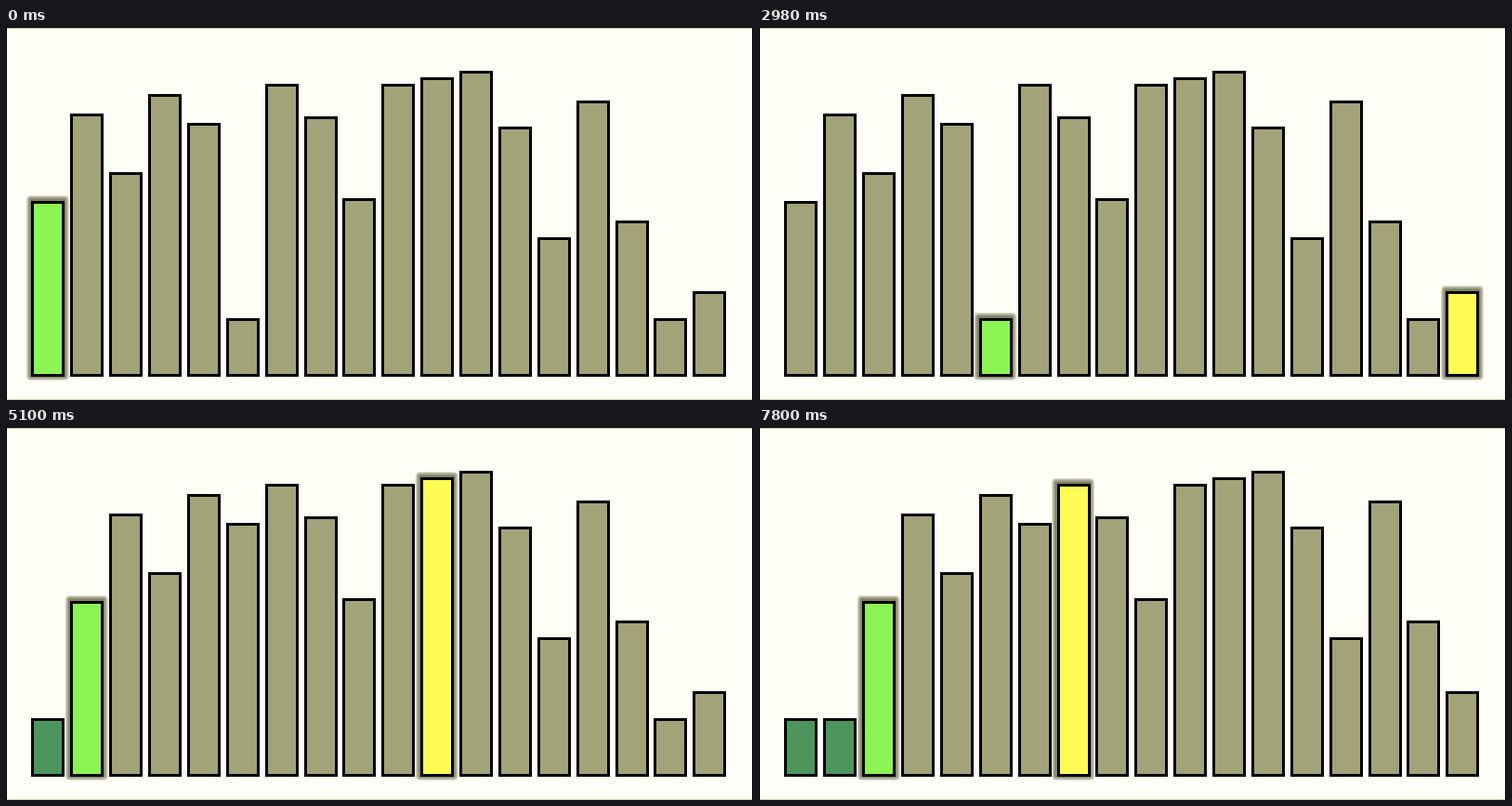
A matplotlib script for the animation above (8 s loop, 804 by 400 pixels).

```python
import matplotlib.pyplot as plt
from matplotlib.animation import FuncAnimation
from matplotlib.patches import FancyBboxPatch, Rectangle

W, H, DPI = 804, 400, 64
INTERVAL, LOOP = 20, 8000
TICK = 141.7                                   # one step of the sort, in ms
HOLDS = {3, 8, 14, 18, 22, 25, 32, 37, 41, 46, 49}   # ticks without a new step
LEFT, PITCH, BAR_W, FLOOR = 28.4, 41.88, 33, 372.5
TOPS = [186, 92, 155, 71, 102, 312, 60, 95, 183,
        60, 53, 46, 106, 225, 78, 207, 312, 283]
IDLE, LOWEST, CHECKED, SORTED = "#a3a37a", "#8cf454", "#fffb55", "#4c965d"
GLOW_SIZES = range(5, 0, -1)


def px(n):
    return n * 72 / DPI


def selection_sort(tops):
    """Yield (tops, sorted count, lowest index, checked index)."""
    tops = list(tops)
    for start in range(len(tops)):
        low = start
        yield list(tops), start, low, None
        for i in range(start + 1, len(tops)):
            yield list(tops), start, low, i
            if tops[i] > tops[low]:
                low = i
        yield list(tops), start, low, None
        tops.insert(start, tops.pop(low))
        yield list(tops), start, start, None


def build_timeline():
    steps = selection_sort(TOPS)
    timeline = []
    for tick in range(int(LOOP / TICK) + 2):
        timeline.append(timeline[-1] if tick in HOLDS else next(steps))
    return timeline


fig = plt.figure(figsize=(W / DPI, H / DPI), dpi=DPI, facecolor="#fffff8")
ax = fig.add_axes([0, 0, 1, 1])
ax.set_xlim(0, W)
ax.set_ylim(H, 0)
ax.axis("off")

for y in (0, H - 1):
    ax.add_patch(Rectangle((0, y), W, 1, fc="#d6d6a6", lw=0))
for x in (0, W - 1):
    ax.add_patch(Rectangle((x, 0), 1, H, fc="black", lw=0))


def make_glow():
    layers = []
    for size in GLOW_SIZES:
        style = f"round,pad={size + 1.5},rounding_size={size}"
        layers.append(ax.add_patch(FancyBboxPatch(
            (0, 0), BAR_W, 1, boxstyle=style, fc="#333308", alpha=0.17,
            lw=0, zorder=2)))
    return layers


def bar_x(i):
    return LEFT + PITCH * i


bars = [ax.add_patch(Rectangle((bar_x(i), 0), BAR_W, 1, ec="black",
                               lw=px(3), zorder=3))
        for i in range(len(TOPS))]
glows = [make_glow(), make_glow()]
timeline = build_timeline()


def update(frame):
    tick = int((frame * INTERVAL + 15) / TICK)
    tops, done, low, checked = timeline[tick]
    for i, (bar, top) in enumerate(zip(bars, tops)):
        color = SORTED if i < done else IDLE
        if i == low:
            color = LOWEST
        elif i == checked:
            color = CHECKED
        bar.set_y(top + 0.5)
        bar.set_height(FLOOR - top - 0.5)
        bar.set_facecolor(color)
    for layers, i in zip(glows, (low, checked)):
        for layer in layers:
            layer.set_visible(i is not None)
            if i is not None:
                layer.set_bounds(bar_x(i), tops[i] + 0.5, BAR_W,
                                 FLOOR - tops[i] - 0.5)
    return bars + glows[0] + glows[1]


anim = FuncAnimation(fig, update, frames=LOOP // INTERVAL, interval=INTERVAL,
                     repeat=True, repeat_delay=0, blit=False)
plt.show()
```
